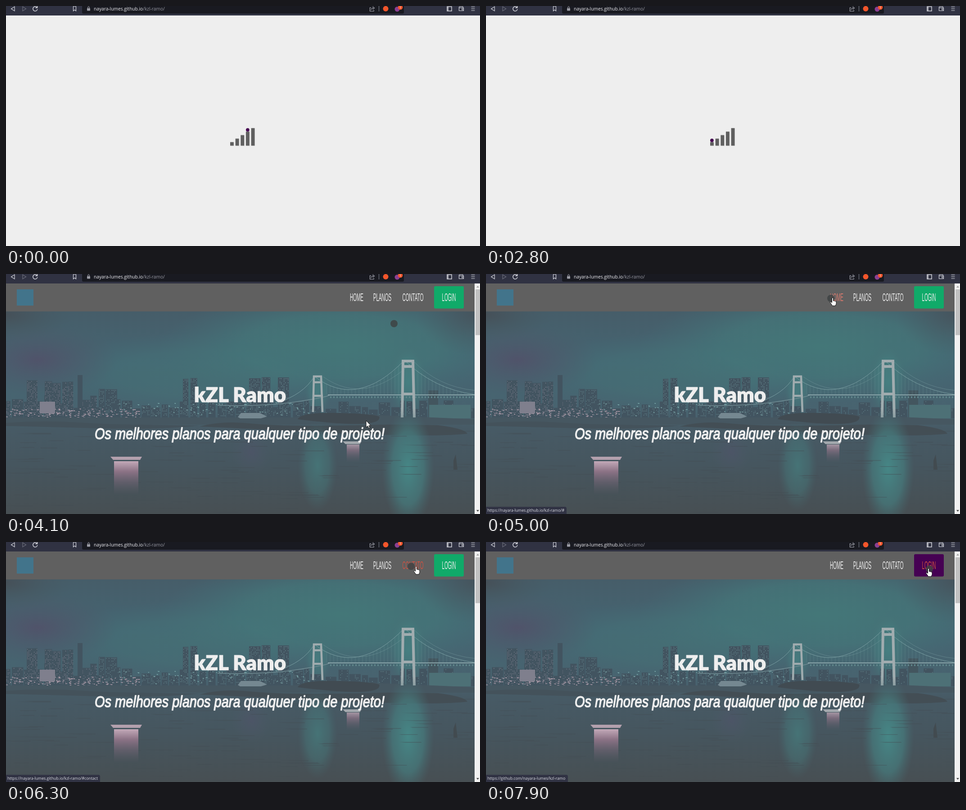
An HTML page that plays this animation: 1053x532 px, repeating every 8 s.

```html
<!DOCTYPE html>
<html lang="pt">
<head>
<meta charset="utf-8">
<title>kZL Ramo</title>
<style>
html, body { margin: 0; width: 100%; height: 100%; overflow: hidden; background: #eee; }
svg { display: block; width: 1053px; height: 532px; }
.ui { font-family: "Open Sans", "Noto Sans", sans-serif; }
.nav { font: 24px "Liberation Sans", Arial, sans-serif; }
.title { font: 900 45.5px Lato, sans-serif; }
.tagline { font: italic 36px "Liberation Sans", Arial, sans-serif; }
.bar { fill: #5f5f5f; transform-box: fill-box; transform-origin: 50% 100%; }
.line { fill: none; stroke: #d6d7de; stroke-width: 1.2; }
</style>
</head>
<body>
<svg viewBox="0 0 1053 532" xmlns="http://www.w3.org/2000/svg">
  <defs>
    <linearGradient id="sky" x2="0" y2="1">
      <stop offset="0" stop-color="#465d69"/><stop offset=".25" stop-color="#456572"/>
      <stop offset=".5" stop-color="#48636f"/><stop offset=".58" stop-color="#475a65"/>
      <stop offset=".75" stop-color="#46565f"/><stop offset="1" stop-color="#474f53"/>
    </linearGradient>
    <radialGradient id="teal">
      <stop offset="0" stop-color="#447778"/><stop offset=".55" stop-color="#447679" stop-opacity=".75"/>
      <stop offset="1" stop-color="#447078" stop-opacity="0"/>
    </radialGradient>
    <radialGradient id="plum">
      <stop offset="0" stop-color="#50536a"/><stop offset="1" stop-color="#4d5a69" stop-opacity="0"/>
    </radialGradient>
    <radialGradient id="shade">
      <stop offset="0" stop-color="#465058"/><stop offset="1" stop-color="#475a63" stop-opacity="0"/>
    </radialGradient>
    <radialGradient id="glow">
      <stop offset="0" stop-color="#468786"/><stop offset=".6" stop-color="#467c7e" stop-opacity=".7"/>
      <stop offset="1" stop-color="#466a70" stop-opacity="0"/>
    </radialGradient>
    <linearGradient id="pink" x2="0" y2="1">
      <stop offset="0" stop-color="#c3a9b8"/><stop offset=".3" stop-color="#8c7386"/>
      <stop offset="1" stop-color="#605a68" stop-opacity="0"/>
    </linearGradient>
    <clipPath id="heroClip"><rect y="83" width="1041" height="449"/></clipPath>
  </defs>

  <rect width="1053" height="532" fill="#eee"/>
  <g id="loader"></g>

  <g id="page">
    <g clip-path="url(#heroClip)">
      <rect y="83" width="1041" height="449" fill="url(#sky)"/>
      <ellipse cx="740" cy="160" rx="400" ry="125" fill="url(#teal)"/>
      <ellipse cx="420" cy="220" rx="330" ry="90" fill="url(#teal)" opacity=".5"/>
      <ellipse cx="70" cy="190" rx="180" ry="80" fill="url(#plum)"/>
      <ellipse cx="0" cy="90" rx="150" ry="60" fill="url(#shade)"/>
      <ellipse cx="1041" cy="90" rx="130" ry="90" fill="url(#shade)" opacity=".7"/>
      <ellipse cx="893" cy="240" rx="45" ry="90" fill="url(#glow)" opacity=".7"/>
      <ellipse cx="692" cy="262" rx="30" ry="55" fill="url(#glow)" opacity=".6"/>
      <g id="city"></g>
      <rect x="75" y="283" width="34" height="26" fill="#7f7f8d"/>
      <rect x="938" y="258" width="22" height="56" fill="#43565f"/>
      <rect x="940" y="290" width="92" height="30" fill="#4d7076"/>
      <path d="M0 318H640Q700 306 830 313L1041 322V334H0Z" fill="#465761"/>
      <path d="M430 338Q480 325 540 331T700 336T830 334T960 335Q1020 343 1025 354Q960 361 800 355T600 346Z" fill="#434e55"/>
      <path d="M648 322Q655 306 735 308T829 316Q834 330 790 332T648 322Z" fill="#414b52"/>
      <path d="M0 330Q80 324 160 329T300 334L430 336Q340 346 200 342T0 337Z" fill="#44525b"/>
      <g fill="none" stroke="#7a9ea2">
        <path d="M470 291Q570 294 640 284T720 268" stroke="#6f8b92" stroke-width="1.5"/>
        <path d="M715 268H1041" stroke="#8aa5aa" stroke-width="2"/>
        <path d="M720 273H1041" stroke="#5f858a" stroke-width="4" stroke-dasharray="3 4"/>
        <path d="M600 286Q660 268 685 227Q780 300 885 191Q950 255 1041 267"/>
        <path d="M705 228Q800 295 905 193Q960 250 1041 258" stroke-opacity=".5"/>
        <path id="hangers" stroke-opacity=".3"/>
      </g>
      <g fill="none" stroke="#a0acaf">
        <path d="M682 306L684 227H700L703 306M683 240H701M681 270H704" stroke-width="4.500"/>
        <path d="M880 318L882 193H904L907 318M881 205H906M879 266H908" stroke-width="6"/>
      </g>
      <ellipse cx="692" cy="425" rx="44" ry="100" fill="url(#glow)" opacity=".6"/>
      <ellipse cx="893" cy="430" rx="58" ry="135" fill="url(#glow)"/>
      <ellipse cx="545" cy="395" rx="45" ry="50" fill="url(#plum)" opacity=".6"/>
      <path id="ripples" fill="#434c52" opacity=".45"/>
      <rect x="240" y="415" width="54" height="75" fill="url(#pink)"/>
      <rect x="757" y="378" width="28" height="40" fill="url(#pink)" opacity=".75"/>
      <path d="M232 405H302L298 412H238Z" fill="#b3a0ad"/>
      <path d="M748 371H790L786 377H754Z" fill="#a2a8ad"/>
      <path d="M515 317L522 308H564L580 316L566 320H520Z" fill="#758891"/>
      <path d="M994 434V414L999 400L1003 434Z" fill="#424b50"/>
    </g>
    <text class="title" x="520" y="284" text-anchor="middle" fill="#eee" stroke="#eee" stroke-width="1" stroke-linejoin="round">kZL Ramo</text>
    <text class="tagline" transform="translate(197 366) scale(.805 1)" fill="#eee" stroke="#eee" stroke-width="1.600" stroke-linejoin="round">Os melhores planos para qualquer tipo de projeto!</text>

    <rect y="21" width="1041" height="62" fill="#606060"/>
    <rect x="24" y="34" width="37" height="36" fill="#42748b"/>
    <rect id="button" x="951" y="27" width="66" height="49.500" rx="3"/>
    <g id="nav" class="nav" text-anchor="middle"></g>

    <rect x="1041" y="21" width="12" height="511" fill="#f1f1f1"/>
    <rect x="1043" y="34" width="10" height="101.500" fill="#c1c1c1"/>
    <path d="M1045 30L1048 26L1051 30Z" fill="#a3a3a3"/>
    <path d="M1045 523L1048 527L1051 523Z" fill="#505050"/>

    <g id="status" class="ui">
      <path id="bubble" fill="#313344"/>
      <text id="link" x="3" y="527" font-size="8.750" fill="#dcdde4"></text>
    </g>
    <circle id="dot" r="8" fill="#3e4344" opacity=".85"/>
    <g id="cursor" fill="#fff" stroke="#111" stroke-linejoin="round">
      <path id="hand" transform="translate(1 -1)" d="M-1.500 1Q-1.500-.5 0-.5T1.500 1V6.500Q3 5.700 4 7Q5.500 6.300 6.500 7.700Q8 7.500 8 9.500V12.500Q8 14.500 6.500 16V17.500H-.5L-1.500 15.500L-5.500 10Q-5.300 8-3.500 9L-1.500 10.500Z"/>
      <path id="arrow" d="M0 0V15L3.500 11.800L6 17L8.300 16L6 11H10.500Z"/>
    </g>
  </g>

  <g id="browser" class="ui">
    <rect width="1053" height="21" fill="#303242"/>
    <path d="M169 0H884V14Q884 17 881 17H172Q169 17 169 14Z" fill="#191a21"/>
    <g class="line">
      <path d="M19 1.500V11L11.500 6.200Z"/>
      <path d="M37 1.500V11L44.500 6.200Z" stroke="#6d6f7c"/>
      <path d="M69 3.500A5 5 0 1 0 69.800 7M69.500 0V4H65.500" stroke-width="1.500"/>
      <path d="M149.500 1H155.500V11L152.500 8.500L149.500 11Z"/>
      <path d="M181.500 5V3.500Q183.500-.5 185.500 3.500V5" stroke="#9a9ba4"/>
      <path d="M811 3.500H808.500V11.500H817V9M811 8.500Q811.500 4.500 816 4.500M814.500 1.500L818.500 4.500L814.500 7.500" stroke="#a9aab3"/>
      <path d="M828.500 0V12" stroke="#777985"/>
      <path d="M980 1.500H990V11H980ZM982 2V11" stroke-width="1.500"/>
      <path d="M1006.500 3V10.500H1016.500V4H1006.500Q1006 1.500 1008 1.500H1015V4M1016.500 6H1013V8.500H1016.500"/>
      <path d="M1033.500 2H1041.500M1033.500 6H1041.500M1033.500 10H1041.500"/>
    </g>
    <rect x="180" y="5" width="7" height="5.500" rx="1" fill="#9a9ba4"/>
    <circle cx="843.500" cy="6" r="6" fill="#f3562b"/>
    <circle cx="869" cy="7" r="5.500" fill="#8a3f91"/>
    <circle cx="876" cy="3" r="5.300" fill="#f1552c"/>
    <text x="876" y="6" font-size="8" text-anchor="middle" fill="#fff">1</text>
    <text x="195" y="10" font-size="10.200" fill="#eeeef2">nayara-lumes.github.io<tspan fill="#9697a1">/kzl-ramo/</tspan></text>
  </g>
</svg>
<script>
const LOOP = 8000, STEP = 100, PAGE_AT = 2900;
const $ = id => document.getElementById(id);

function add(parent, tag, attrs, text = '') {
  const el = document.createElementNS('http://www.w3.org/2000/svg', tag);
  for (const k in attrs) el.setAttribute(k, attrs[k]);
  el.textContent = text;
  return parent.appendChild(el);
}

// Linear value at time t from rows of [time, ...values]
function track(rows, t) {
  let i = 0;
  while (i < rows.length - 2 && t >= rows[i + 1][0]) i++;
  const [a, b] = [rows[i], rows[i + 1]];
  const p = Math.min(1, Math.max(0, (t - a[0]) / (b[0] - a[0])));
  return a.slice(1).map((v, k) => v + (b[k + 1] - v) * p);
}

const mix = (a, b, p) => `rgb(${a.map((v, i) => Math.round(v + (b[i] - v) * p))})`;

// Loader: five bars and a bouncing ball, on a 0-100 phase
const UNIT = .777, FLOOR = 309.5, LEFT = 498;
const loaderAnims = [];
function phased(el, frames) {
  const anim = el.animate(frames.map(f => ({ ...f, easing: 'ease' })), { duration: 100, fill: 'both' });
  anim.pause();
  loaderAnims.push(anim);
}
[[.2, 1], [.4, .8], [.6, .6], [.8, .4], [1, .2]].forEach(([low, high], i) => {
  const box = { y: FLOOR - 50 * UNIT, width: 10 * UNIT, height: 50 * UNIT, x: LEFT + i * 15 * UNIT, class: 'bar' };
  const shadow = add($('loader'), 'rect', { ...box, x: box.x + .7, y: box.y + .7, style: 'fill:#ccc' });
  const bar = add($('loader'), 'rect', box);
  const frames = [[0, low], [.4, low], [.5, high], [.9, high], [1, low]]
    .map(([offset, s]) => ({ offset, transform: `scaleY(${s})` }));
  phased(shadow, frames);
  phased(bar, frames);
});
const hops = [[0, 0, 0], [5, 8, -14], [10, 15, -10], [17, 23, -24], [20, 30, -20], [27, 38, -34], [30, 45, -30],
  [37, 53, -44], [40, 60, -40], [50, 60, 0], [57, 53, -14], [60, 45, -10], [67, 37, -24], [70, 30, -20],
  [77, 22, -34], [80, 15, -30], [87, 7, -44], [90, 0, -40], [100, 0, 0]];
const ball = add($('loader'), 'circle', { cx: LEFT + 5 * UNIT, cy: FLOOR - 15 * UNIT, r: 5 * UNIT, fill: '#44024f' });
phased(ball, hops.map(([at, x, y]) => ({ offset: at / 100, transform: `translate(${x * UNIT}px, ${y * UNIT}px)` })));
const phases = [[0, 30], [200, 37], [300, 41], [400, 41], [900, 57], [1000, 57],
  [1900, 80], [2100, 87], [2200, 87], [2800, 100]];

// Skyline with rows of lit windows, denser towards the shore
let seed = 11;
const rnd = () => (seed = seed * 16807 % 2147483647) / 2147483647;
const ROSE = '#a99fb0', AQUA = '#82b0b2';
function skyline(from, to, top, spread, light, lit = .3) {
  let walls = '', lights = '';
  for (let x = from; x < to;) {
    const w = 10 + rnd() * 16, y = top + rnd() * spread;
    walls += `M${x} 320V${y}h${w}V320Z`;
    for (let wy = y + 2; wy < 314; wy += 3)
      for (let wx = x + 1; wx < x + w - 1; wx += 3)
        if (rnd() < lit) lights += `M${wx} ${wy}h1.3v1.3h-1.3Z`;
    x += w + rnd() * 5;
  }
  add($('city'), 'path', { d: walls, fill: '#425460' });
  add($('city'), 'path', { d: lights, fill: light, opacity: .65 });
}
skyline(0, 200, 268, 30, ROSE);
skyline(200, 390, 276, 26, AQUA);
skyline(46, 66, 234, 3, ROSE, .45);
skyline(86, 138, 236, 6, ROSE, .45);
skyline(206, 236, 252, 6, AQUA, .35);
skyline(393, 426, 229, 4, AQUA, .45);
skyline(430, 680, 270, 26, AQUA);
skyline(540, 580, 227, 6, AQUA, .45);
skyline(604, 628, 227, 4, AQUA, .45);
skyline(710, 1041, 280, 22, AQUA, .2);
add($('city'), 'rect', { x: 159, y: 224, width: 11, height: 94, fill: '#425460' });

// Short horizontal strokes scattered in a band
function dashes(n, x, y, w, h, len, thick) {
  let d = '';
  for (let i = 0; i < n; i++) d += `M${x + rnd() * w} ${y + rnd() * h}h${(.3 + rnd()) * len}v${thick}h${-len / 2}Z`;
  return d;
}
add($('city'), 'path', { d: dashes(130, 0, 298, 300, 20, 5, 1.8), fill: '#c7aebb', opacity: .75 });
add($('city'), 'path', { d: dashes(70, 250, 284, 420, 30, 4, 1.8), fill: '#8fc0bf', opacity: .7 });
$('ripples').setAttribute('d', dashes(110, -40, 345, 1080, 187, 70, 1.6));

let ropes = '';
for (let x = 712; x < 876; x += 8) {
  const k = (x - 685) / 200;
  ropes += `M${x} ${227 * (1 - k) ** 2 + 598 * k * (1 - k) + 191 * k * k}V268`;
}
for (let x = 915; x < 1036; x += 8) ropes += `M${x} ${267 - 75 * ((1041 - x) / 156) ** 1.6}V268`;
$('hangers').setAttribute('d', ropes);

// Menu: label, centre, hover start and end, fade length, status text, bubble width
const WHITE = [238, 238, 238], RED = [208, 82, 66], GREEN = [16, 170, 105], PURPLE = [70, 1, 83];
const site = 'https://nayara-lumes.github.io/kzl-ramo/';
const menu = [
  ['HOME', 779, 4700, 5200, 400, site + '#', 179],
  ['PLANOS', 836, 5300, 5800, 400, site + '#plans', 201],
  ['CONTATO', 904, 5900, 6650, 400, site + '#contact', 209],
  ['LOGIN', 984, 6700, 9000, 600, 'https://github.com/nayara-lumes/kzl-ramo', 182],
].map(([label, x, from, to, fade, url, width]) => ({
  from, to, fade, url, width,
  el: add($('nav'), 'text', { transform: `translate(${x} 60) scale(.415 1)` }, label),
}));
const clamp = v => Math.min(1, Math.max(0, v));
const heat = (m, t) => clamp((t - m.from) / m.fade) * (1 - clamp((t - m.to) / m.fade));

const pointer = [[3600, 880, 30], [3700, 880, 30], [3800, 862, 110], [4100, 800, 325], [4300, 765, 300],
  [4600, 757, 100], [4700, 766, 54], [4800, 768, 56], [4900, 768, 56], [5000, 769, 54], [5200, 795, 58],
  [5400, 845, 50], [5700, 855, 50], [5800, 862, 50], [5900, 885, 52], [6000, 900, 54], [6100, 900, 54],
  [6400, 915, 56], [6500, 935, 58], [6700, 975, 61], [6800, 983, 61], [7300, 985, 60], [7600, 985, 60],
  [7900, 982, 60]];
const LAG = 300;

const show = (el, on) => { el.style.display = on ? '' : 'none'; };
const place = (el, [x, y]) => el.setAttribute('transform', `translate(${x} ${y})`);

function draw(t) {
  const onPage = t >= PAGE_AT;
  show($('loader'), !onPage);
  show($('page'), onPage);
  if (!onPage) {
    const [phase] = track(phases, t);
    loaderAnims.forEach(a => { a.currentTime = phase; });
    return;
  }
  menu.forEach(m => m.el.setAttribute('fill', mix(WHITE, RED, heat(m, t))));
  $('button').setAttribute('fill', mix(GREEN, PURPLE, heat(menu[3], t)));

  const last = menu.filter(m => t >= m.from).pop();
  show($('status'), last);
  if (last) {
    $('link').textContent = last.url;
    $('bubble').setAttribute('d', `M0 516H${last.width - 4}q4 0 4 4V532H0Z`);
  }

  const moving = t >= pointer[0][0], over = menu.some(m => t >= m.from && t < m.to);
  show($('cursor'), moving);
  show($('dot'), moving);
  show($('hand'), over);
  show($('arrow'), !over);
  place($('cursor'), track(pointer, t));
  place($('dot'), track(pointer, t - LAG));
}

function tick() {
  draw(Math.floor(performance.now() % LOOP / STEP) * STEP);
  requestAnimationFrame(tick);
}
tick();
</script>
</body>
</html>
```
